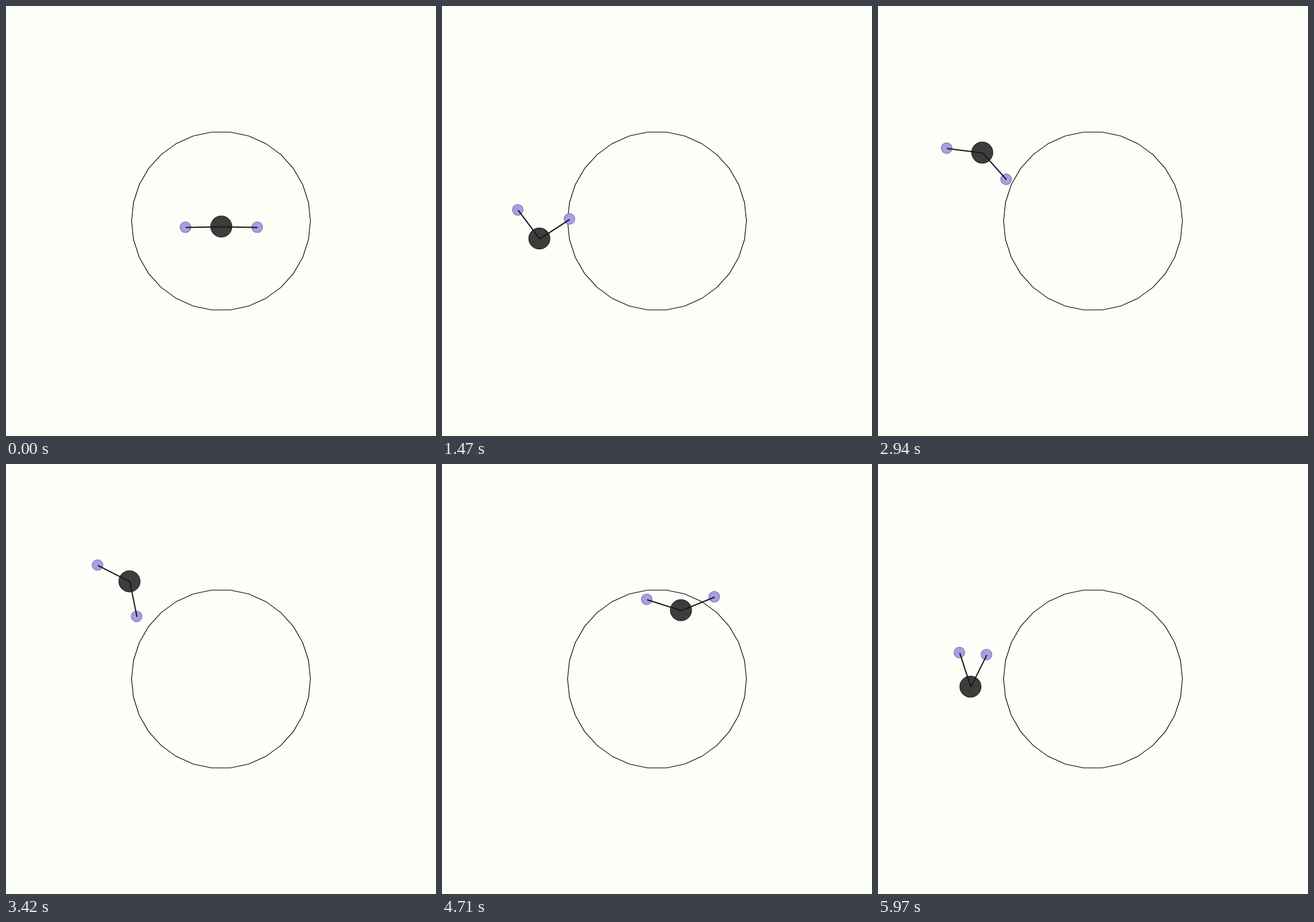
An HTML page with a canvas for the animation above (6000 ms loop, 700x700 px).

```html
<!DOCTYPE html>
<html lang="en">
<head>
<meta charset="utf-8">
<title>Two-armed swimmer</title>
<style>
  html, body { margin: 0; width: 100%; height: 100%; overflow: hidden; background: #fdfef8; }
  canvas { display: block; }
</style>
</head>
<body>
<canvas id="stage" width="700" height="700"></canvas>
<script>
const ctx = document.getElementById('stage').getContext('2d');
const LOOP = 6000, STEP = 30, ARM = 58.4, TAU = Math.PI * 2;

// Turning points of the swim; angles in degrees, clockwise from the right
const keys = [
  { t: 0, x: 350.5, y: 359, left: 179, right: 361 },
  { t: 660, x: 243.5, y: 347.5, left: 73, right: 347 },
  { t: 1470, x: 158.5, y: 378.5, left: 233, right: 327 },
  { t: 2400, x: 163.5, y: 273, left: 210.5, right: 441 },
  { t: 2800, x: 165, y: 250, left: 188, right: 405 },
  { t: 3420, x: 201, y: 191, left: 207, right: 438.5 },
  { t: 4000, x: 264, y: 137, left: 265, right: 328 },
  { t: 4710, x: 389, y: 238, left: 197.5, right: 338 },
  { t: 5050, x: 290, y: 273, left: 180, right: 350 },
  { t: 5970, x: 150.5, y: 362.5, left: 252, right: 296.5 }
];

const mix = (a, b, u) => a + (b - a) * u;
const slope = (a, b, part) => (b[part] - a[part]) / (b.t - a.t);

// Rate of change at key i, weighted for uneven spacing
function rate(i, part) {
  const a = keys[i - 1], b = keys[i], c = keys[i + 1];
  if (!a) return slope(b, c, part);
  if (!c) return slope(a, b, part);
  return mix(slope(a, b, part), slope(b, c, part), (b.t - a.t) / (c.t - a.t));
}

// Smooth curve of one part (x, y, left or right) through the keys
function valueAt(t, part) {
  const i = Math.max(0, keys.slice(1, -1).filter(k => k.t <= t).length);
  const a = keys[i], b = keys[i + 1], span = b.t - a.t;
  const u = (t - a.t) / span, v = 1 - u;
  return mix(a[part], b[part], u * u * (3 - 2 * u)) +
    span * u * v * (v * rate(i, part) - u * rate(i + 1, part));
}

function polar(x, y, r, angle) {
  return [x + r * Math.cos(angle), y + r * Math.sin(angle)];
}

function disc(x, y, r, fill, edge) {
  ctx.beginPath();
  ctx.arc(x, y, r, 0, TAU);
  ctx.fillStyle = fill;
  ctx.fill();
  ctx.strokeStyle = edge;
  ctx.lineWidth = 1.3;
  ctx.stroke();
}

function ring() {
  ctx.beginPath();
  for (let i = 0; i < 30; i++) ctx.lineTo(...polar(350, 350, 145.6, i / 30 * TAU));
  ctx.closePath();
  ctx.strokeStyle = '#000';
  ctx.lineWidth = 1.1;
  ctx.stroke();
}

function draw(t) {
  const [x, y, left, right] = ['x', 'y', 'left', 'right'].map(part => valueAt(t, part));
  const hands = [left, right].map(deg => polar(x, y, ARM, deg * TAU / 360));
  ctx.fillStyle = '#fdfef8';
  ctx.fillRect(0, 0, 700, 700);
  ring();
  disc(x, y, 17.2, '#3d3d3d', '#2a2a2a');
  for (const hand of hands) disc(...hand, 8.7, '#a5a0e0', '#8580b8');

  ctx.save();
  ctx.translate(0.6, 0.6);
  ctx.beginPath();
  for (const hand of hands) {
    ctx.moveTo(x, y);
    ctx.lineTo(...hand);
  }
  ctx.strokeStyle = '#18181c';
  ctx.lineWidth = 2;
  ctx.stroke();
  ctx.restore();
}

const start = performance.now();
function tick() {
  const t = (performance.now() - start) % LOOP;
  draw(Math.floor(t / STEP) * STEP);
  requestAnimationFrame(tick);
}
tick();
</script>
</body>
</html>
```
